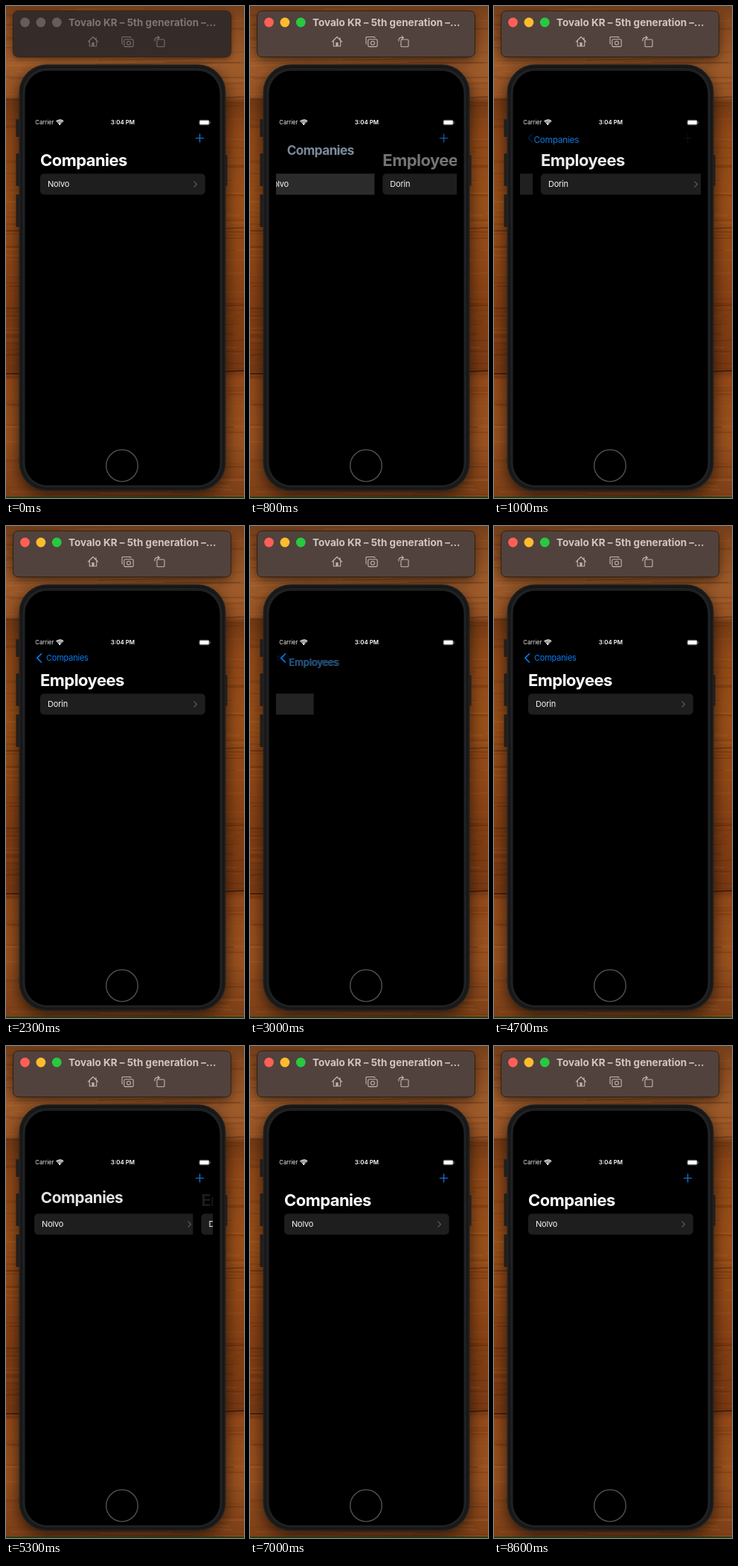
Animation of 320x661 px, one loop 8.7 s. Source, as an HTML page with a canvas:

```html
<!DOCTYPE html>
<html lang="en">
<head>
<meta charset="utf-8">
<title>Navigation demo</title>
<style>
html, body { margin: 0; width: 100%; height: 100%; overflow: hidden; background: #000; }
canvas { display: block; }
</style>
</head>
<body>
<canvas id="stage" width="320" height="661"></canvas>
<script>
const W = 320, H = 661, LOOP = 8700, STEP = 100;
const ctx = document.getElementById('stage').getContext('2d');
const FONT = 'Inter, "Liberation Sans", sans-serif';
const BLUE = '#0a7cf0';
const SCREEN = { left: 35, right: 278, width: 243 };

const screens = [
  { title: 'Companies', row: 'Nolvo', plus: true },
  { title: 'Employees', row: 'Dorin' },
  {}
];

// Each move goes between screens `low` and `low + 1`.
const moves = [
  { start: 690, low: 0, push: true },
  { start: 2790, low: 1, push: true },
  { start: 3734, low: 1, push: false },
  { start: 5030, low: 0, push: false }
];

function settle(ms) {
  const x = 14 * Math.max(0, ms) / 1000;
  const p = 1 - (1 + x) * Math.exp(-x);
  return p > 0.993 ? 1 : p;
}

function navigation(t) {
  const move = moves.filter(m => t >= m.start).pop();
  if (!move) return { low: 0, p: 0 };
  const p = settle(t - move.start);
  return { low: move.low, p: move.push ? p : 1 - p };
}

function pressedRow(t) {
  const move = moves.find(m => m.push && t >= m.start - 190 && t < m.start + 400);
  return move ? move.low : -1;
}

function roundRect(c, x, y, w, h, r, fill, stroke, line = 1) {
  c.beginPath();
  c.roundRect(x, y, w, h, r);
  if (fill) { c.fillStyle = fill; c.fill(); }
  if (stroke) { c.strokeStyle = stroke; c.lineWidth = line; c.stroke(); }
}

function polyline(points, color, width) {
  ctx.beginPath();
  points.forEach(([x, y]) => ctx.lineTo(x, y));
  ctx.strokeStyle = color;
  ctx.lineWidth = width;
  ctx.lineCap = ctx.lineJoin = 'round';
  ctx.stroke();
}

function disc(x, y, r, color) {
  ctx.beginPath();
  ctx.arc(x, y, r, 0, Math.PI * 2);
  ctx.fillStyle = color;
  ctx.fill();
}

function label(text, x, y, size, color, weight = 400, spacing = 0) {
  ctx.font = `${weight} ${size}px ${FONT}`;
  ctx.letterSpacing = spacing + 'px';
  ctx.fillStyle = color;
  ctx.fillText(text, x, y);
}

function withAlpha(alpha, draw) {
  if (alpha <= 0) return;
  ctx.save();
  ctx.globalAlpha *= Math.min(1, alpha);
  draw();
  ctx.restore();
}

function seeded(seed) {
  return () => (seed = (seed * 16807) % 2147483647) / 2147483647;
}

function paintWood(c) {
  const tones = [
    [0, '#74401b'], [0.03, '#87491e'], [0.12, '#9f5c2b'], [0.185, '#9b5423'],
    [0.195, '#773b14'], [0.26, '#924917'], [0.4, '#9a4f18'], [0.52, '#914716'],
    [0.62, '#843f13'], [0.74, '#7b3a13'], [0.76, '#954a19'], [0.88, '#9b511e'], [1, '#7c3f17']
  ];
  const base = c.createLinearGradient(0, 0, 0, H);
  tones.forEach(([at, color]) => base.addColorStop(at, color));
  c.fillStyle = base;
  c.fillRect(0, 0, W, H);

  const rand = seeded(4127);
  for (let i = 0; i < 420; i++) {
    const x = rand() * W - 60, y = rand() * H, len = 30 + rand() * 170;
    const dark = rand() < 0.58;
    c.strokeStyle = dark ? `rgba(65,25,5,${0.05 + rand() * 0.2})`
                         : `rgba(225,135,65,${0.04 + rand() * 0.13})`;
    c.lineWidth = 0.6 + rand() * 2;
    c.beginPath();
    c.moveTo(x, y);
    c.quadraticCurveTo(x + len / 2, y + rand() * 4 - 2, x + len, y + rand() * 6 - 3);
    c.stroke();
  }
  [[124, 0.35], [300, 0.4], [492, 0.75], [404, 0.3]].forEach(([y, a]) => {
    c.strokeStyle = `rgba(40,14,3,${a})`;
    c.lineWidth = 1.6;
    c.beginPath();
    c.moveTo(0, y + 2);
    c.quadraticCurveTo(200, y + 3, W, y - 2);
    c.stroke();
  });
}

function paintPhone(c) {
  c.save();
  c.shadowColor = 'rgba(0,0,0,0.7)';
  c.shadowBlur = 22;
  c.shadowOffsetY = 6;
  roundRect(c, 18, 79, 277, 572, 37, '#1c1c1c');
  c.restore();
  [[13.5, 152, 24], [13.5, 198, 44], [13.5, 253, 44], [293, 200, 42]].forEach(([x, y, h]) =>
    roundRect(c, x, y, 4.5, h, 1.5, '#201d1b'));
  roundRect(c, 18, 79, 277, 572, 37, '#1a1a1a', '#272727', 1);
  roundRect(c, 21.5, 82.5, 270, 565, 34, '#202122', '#131313', 1);
  roundRect(c, 25.5, 87, 262, 557, 30, '#000');
  c.strokeStyle = '#565656';
  c.lineWidth = 1.3;
  c.beginPath();
  c.arc(156, 617.5, 21.3, 0, Math.PI * 2);
  c.stroke();
  c.fillStyle = '#123d0c';
  c.fillRect(0, 659.5, W, 1.5);
}

function makeBackdrop() {
  const layer = document.createElement('canvas');
  layer.width = W;
  layer.height = H;
  const c = layer.getContext('2d');
  paintWood(c);
  paintPhone(c);
  return layer;
}

function drawToolbar(active) {
  ctx.save();
  ctx.shadowColor = 'rgba(0,0,0,0.55)';
  ctx.shadowBlur = active ? 16 : 8;
  ctx.shadowOffsetY = active ? 5 : 2;
  roundRect(ctx, 10, 7, 292, 61, 6, active ? '#51423d' : '#352b28');
  ctx.restore();
  roundRect(ctx, 10.5, 7.5, 291, 60, 6, null, active ? '#65564f' : '#4a3e39', 0.7);
  roundRect(ctx, 9.8, 6.8, 292.4, 61.4, 6.5, null, '#15100e', 0.8);

  const lights = active ? ['#ff5f57', '#febc2e', '#28c840'] : Array(3).fill('#665d5a');
  lights.forEach((color, i) => disc(25.5 + 21.4 * i, 22, 6.4, color));
  label('Tovalo KR – 5th generation –...', 84, 26.8, 13.5, active ? '#d3c6c1' : '#80746f', 700);

  const ink = active ? '#c3b5af' : '#7a6e69';
  polyline([[110.5, 48], [117, 41.5], [123.5, 48]], ink, 1.2);
  polyline([[112.3, 47], [112.3, 54], [121.7, 54], [121.7, 47]], ink, 1.1);
  roundRect(ctx, 115.4, 49, 3.2, 5, 0.4, ink);
  polyline([[121, 43], [121, 45]], ink, 1.4);

  polyline([[156.5, 51], [156, 50], [156, 42.5], [157, 41.5], [167, 41.5], [168, 42.5]], ink, 1.1);
  roundRect(ctx, 158.8, 44.8, 12.4, 9.8, 1.7, null, ink, 1.1);
  ctx.beginPath();
  ctx.arc(165, 49.7, 2.5, 0, Math.PI * 2);
  ctx.stroke();

  roundRect(ctx, 203, 45, 10, 9.8, 1.3, null, ink, 1.1);
  polyline([[200, 47], [200, 44.5], [202, 42.5], [206, 42.5]], ink, 1.1);
  polyline([[204, 40.5], [206.2, 42.5], [204, 44.5]], ink, 1.1);
}

function drawStatus() {
  label('Carrier', 39.3, 159.3, 7.7, '#eee');
  label('3:04 PM', 140.8, 159.3, 7.9, '#fff', 600);
  ctx.strokeStyle = '#fff';
  ctx.lineWidth = 1.25;
  ctx.lineCap = 'butt';
  [2.8, 4.8, 6.7].forEach(r => {
    ctx.beginPath();
    ctx.arc(72.2, 159.7, r, -Math.PI * 0.76, -Math.PI * 0.24);
    ctx.stroke();
  });
  disc(72.2, 158.9, 1.1, '#fff');
  roundRect(ctx, 259.8, 153.2, 13.6, 6.7, 1.8, null, '#777', 0.6);
  roundRect(ctx, 260.4, 153.8, 12.4, 5.5, 1.3, '#fff');
  roundRect(ctx, 274, 155.5, 0.9, 2.3, 0.5, '#888');
}

function drawRow(screen, shift, highlight = 0) {
  if (!screen.row) return;
  roundRect(ctx, 46 + shift, 225.3, 221.7, 28.2, 5, '#1e1e1f');
  withAlpha(highlight, () => roundRect(ctx, 46 + shift, 225.3, 221.7, 28.2, 5, '#363638'));
  label(screen.row, 56 + shift, 243.2, 11, '#f5f5f5', 400, -0.2);
  polyline([[252.8, 235.8], [256.5, 239.5], [252.8, 243.2]].map(([x, y]) => [x + shift, y]), '#59595d', 1.2);
}

function largeTitle(text, x, y, size = 22) {
  label(text, x, y, size, '#fff', 700, -0.025 * size);
}

function backLabel(text, x, y, size = 11) {
  label(text, x, y, size, BLUE, 400, -0.02 * size);
}

function backArrow(shift = 0) {
  polyline([[47.5, 171.8], [41.8, 177.4], [47.5, 183]].map(([x, y]) => [x + shift, y]), BLUE, 1.6);
}

function drawPlus() {
  polyline([[255.3, 177.5], [265.9, 177.5]], '#1b78e2', 1.2);
  polyline([[260.6, 172.2], [260.6, 182.8]], '#1b78e2', 1.2);
}

function drawPages({ low, p }, pressed) {
  const under = screens[low], over = screens[low + 1];
  const slide = SCREEN.width * (1 - p);
  const drift = -0.3 * SCREEN.width * p;
  const edge = SCREEN.left + slide;

  ctx.save();
  ctx.beginPath();
  ctx.rect(SCREEN.left, 150, SCREEN.width, 432);
  ctx.clip();

  ctx.save();
  ctx.beginPath();
  ctx.rect(SCREEN.left, 185, slide, 397);
  ctx.clip();
  drawRow(under, drift, pressed === low ? 1 - p : 0);
  ctx.restore();

  ctx.save();
  ctx.beginPath();
  ctx.rect(edge, 185, SCREEN.width, 397);
  ctx.clip();
  drawRow(over, slide);
  ctx.restore();

  // The lower title shrinks into the upper page's back label.
  const x = 46 + 8 * p, y = 215 - 33.8 * p, size = 22 - 11 * p;
  withAlpha(1 - p, () => largeTitle(under.title, x, y, size));
  withAlpha(p * p, () => backLabel(under.title, x, y, size));

  if (over.title) withAlpha(p, () => largeTitle(over.title, 46 + slide, 215));
  if (under.plus) withAlpha(1 - p ** 2, drawPlus.bind(null));
  if (low > 0) {
    withAlpha(1 - p, () => backLabel(screens[low - 1].title, 54 + drift, 181.2));
    backArrow();
  } else {
    withAlpha(p ** 20, () => backArrow(60 * (1 - p)));
  }
  ctx.restore();
}

const backdrop = makeBackdrop();

function render(now) {
  const t = Math.floor((now % LOOP) / STEP) * STEP;
  ctx.drawImage(backdrop, 0, 0);
  drawToolbar(t >= 100);
  drawStatus();
  drawPages(navigation(t), pressedRow(t));
}

const began = performance.now();
function tick() {
  render(performance.now() - began);
  requestAnimationFrame(tick);
}
tick();
</script>
</body>
</html>
```
